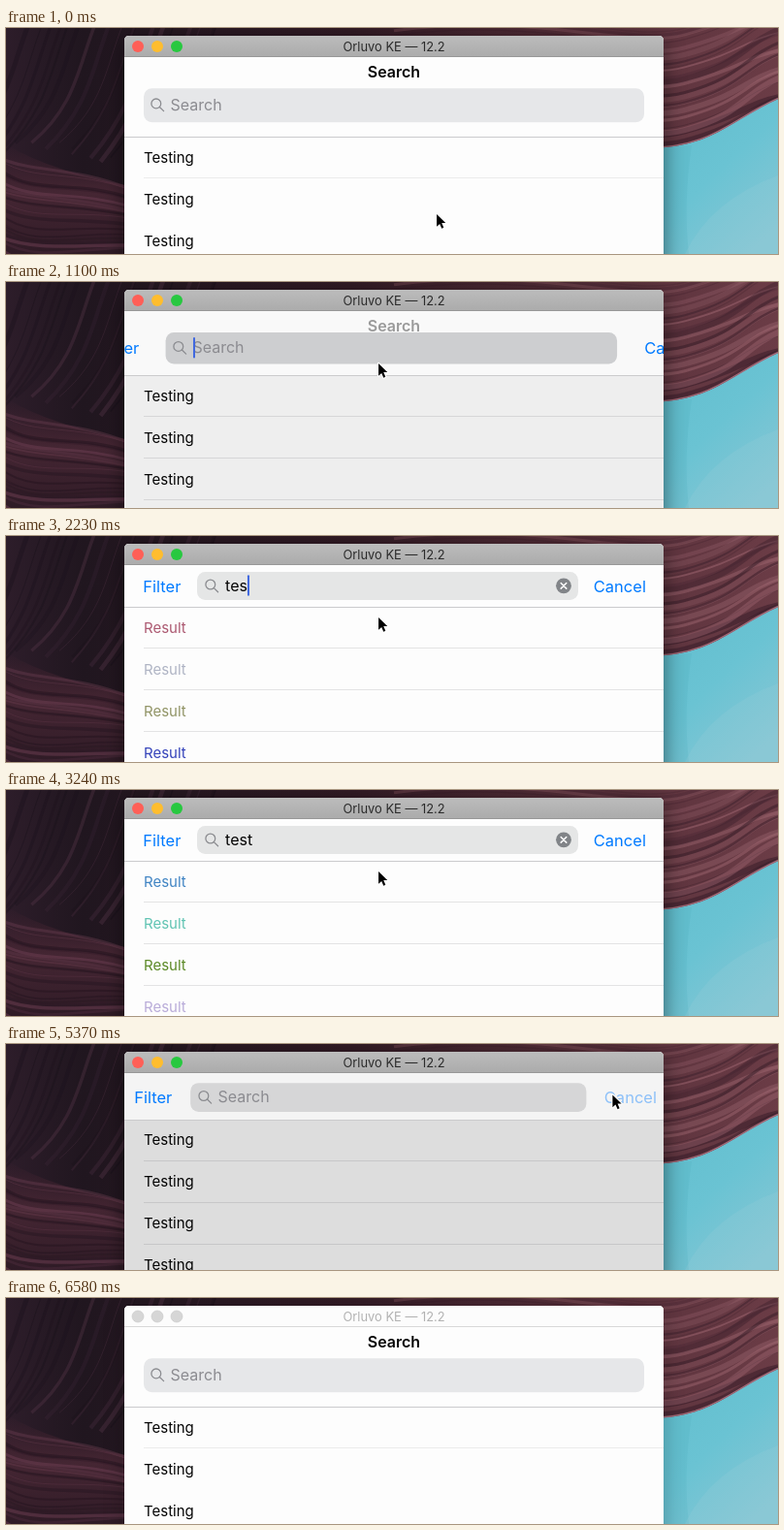
These frames come from a looping animation (796x233 px, 6680 ms). An HTML page:

```html
<!DOCTYPE html>
<html lang="en">
<head>
<meta charset="utf-8">
<title>Search bar</title>
<style>
  html, body { margin: 0; width: 100%; height: 100%; overflow: hidden; background: #211821; }
  svg { display: block; width: 100vw; height: 100vh; }
  text { font-family: Inter, Roboto, "Liberation Sans", sans-serif; font-size: 16px; white-space: pre; }
  .row { font-size: 15px; }
  .action { font-size: 16.5px; fill: #007aff; }
</style>
</head>
<body>
<svg id="stage" viewBox="0 0 796 233" preserveAspectRatio="none">
  <defs>
    <linearGradient id="rockBase">
      <stop offset="0" stop-color="#2d1d2a"/><stop offset=".1" stop-color="#20161f"/>
      <stop offset=".45" stop-color="#321b25"/><stop offset=".75" stop-color="#57303a"/>
      <stop offset="1" stop-color="#6b3c46"/>
    </linearGradient>
    <linearGradient id="lowerRock" x2="0" y2="1">
      <stop offset="0" stop-color="#472432" stop-opacity="0"/>
      <stop offset=".45" stop-color="#452633"/><stop offset="1" stop-color="#2f1b26"/>
    </linearGradient>
    <linearGradient id="water" x2=".8" y2="1">
      <stop offset="0" stop-color="#5fbdcd"/><stop offset=".55" stop-color="#6ac3d3"/>
      <stop offset="1" stop-color="#87c6d4"/>
    </linearGradient>
    <linearGradient id="barFill" x2="0" y2="1">
      <stop offset="0" stop-color="#bcbcbc"/><stop offset="1" stop-color="#ababab"/>
    </linearGradient>
    <filter id="blur" x="-20%" y="-20%" width="140%" height="140%"><feGaussianBlur stdDeviation="11"/></filter>
    <filter id="soften"><feGaussianBlur stdDeviation=".7"/></filter>
    <clipPath id="windowClip"><path d="M122 240V13q0-5 5-5h546q5 0 5 5v227z"/></clipPath>
  </defs>

  <rect width="796" height="233" fill="url(#rockBase)"/>
  <path d="M0 120Q50 150 140 165V233H0z" fill="url(#lowerRock)"/>
  <g id="strands" fill="none" filter="url(#soften)"/>
  <path d="M660 124C728 124 745 96 796 73V233H660z" fill="url(#water)"/>
  <path d="M704 233Q698 180 707 121L660 124V233z" fill="#4ba8ba" opacity=".2"/>
  <path d="M700 233Q726 178 796 152V233z" fill="#94cad8" opacity=".25"/>
  <path d="M660 123.5C728 123.5 745 95.5 796 72.5" fill="none" stroke="#a06a78" stroke-width="1.4"/>
  <rect id="shadow" x="122" y="14" width="556" height="260" rx="5" filter="url(#blur)"/>

  <g clip-path="url(#windowClip)">
    <rect x="122" y="8" width="556" height="225" fill="#fdfdfd"/>
    <g id="list"></g>
    <rect id="header" x="122" y="29" width="556"/>
    <rect id="headerLine" x="122" width="556" height="1" fill="#cbcbcd"/>
    <text id="heading" x="400" y="50.5" text-anchor="middle" font-weight="600" fill="#050505">Search</text>
    <rect id="field" rx="8.5"/>
    <g id="lens" fill="none" stroke="#8b8c90" stroke-width="1.3" stroke-linecap="round">
      <circle r="4.9"/><path d="M3.6 3.6L7.8 7.7"/>
    </g>
    <text id="fieldText"></text>
    <rect id="caret" width="2" height="21.5" rx="1" fill="#4068e0"/>
    <g id="clear" transform="translate(575 51.3)">
      <circle r="7.9" fill="#818488"/>
      <path d="M-2.8-2.8L2.8 2.8M2.8-2.8L-2.8 2.8" stroke="#fff" stroke-width="1.5" stroke-linecap="round"/>
    </g>
    <text id="filter" class="action">Filter</text>
    <text id="cancel" class="action">Cancel</text>
    <rect id="bar" x="122" y="8" width="556" height="21.5"/>
    <rect id="barLine" x="122" y="29" width="556" height="1"/>
    <circle class="light" cx="136" cy="19" r="6"/>
    <circle class="light" cx="156" cy="19" r="6"/>
    <circle class="light" cx="176" cy="19" r="6"/>
    <text id="windowTitle" x="400" y="24" text-anchor="middle" style="font-size:12.9px">Orluvo KE — 12.2</text>
  </g>

  <path id="pointer" d="M.6 1.4V14.2L3.7 11.4 5.8 16.2 7.8 15.3 5.8 10.6H9.8Z"
        fill="#000" stroke="#fff" stroke-width="2.2" stroke-linejoin="round" style="paint-order:stroke"/>
</svg>
<script>
const LOOP = 6680;
const SVG_NS = 'http://www.w3.org/2000/svg';
const $ = id => document.getElementById(id);

const KEYS = [[1880, 't'], [2060, 'te'], [2230, 'tes'], [2400, 'test'],
              [3600, 'tes'], [3840, 'te'], [4020, 't'], [4260, '']];
const TEST_COLORS = ['#4084c3', '#61c4b3', '#5c8a27', '#b9acd9'];
const LIGHTS = ['#ff5f57', '#ffbd2e', '#28c840'];
const MOVES = [
  { from: 240, to: 700, steps: 9, end: [383.5, 82.5] },
  { from: 4560, to: 5020, steps: 9, end: [624.8, 51] },
  { from: 5900, to: 6240, steps: 7, end: [786, 241] }
];

const set = (el, attrs) => { for (const name in attrs) el.setAttribute(name, attrs[name]); };
const add = (parent, tag, attrs) => {
  const el = document.createElementNS(SVG_NS, tag);
  set(el, attrs);
  return parent.appendChild(el);
};
const lerp = (a, b, p) => a + (b - a) * p;
const smooth = p => { p = Math.min(1, Math.max(0, p)); return p * p * (3 - 2 * p); };
const random = seed => { const v = Math.sin(seed * 127.1 + 3.7) * 43758.5453; return v - Math.floor(v); };
const mix = (a, b, p) => `rgb(${a.map((v, i) => Math.round(lerp(v, b[i], p)))})`;

// Number of steps taken: the first falls on `from`, the last on `to`.
function stepCount(t, from, to, steps) {
  if (t < from) return 0;
  return Math.min(steps, Math.floor((t - from) / (to - from) * (steps - 1) + 1e-6) + 1);
}

function drawStrands() {
  const strand = (d, color, width, opacity) =>
    add($('strands'), 'path', { d, stroke: color, 'stroke-width': width, opacity });
  for (let i = 0; i < 28; i++) {
    const y = 138 + i * 5 + random(i + 7) * 8, bend = 6 + random(i) * 18;
    strand(`M-5 ${y - 6}C30 ${y + bend} 70 ${y + 2} 130 ${y + 26 - i * 1.5}`,
      random(i + 50) < .5 ? '#734357' : '#22141e', .6 + random(i + 90) * 3, .2 + random(i + 30) * .3);
  }
  for (let i = 0; i < 18; i++) {
    const x = i * 12 - 20 + random(i + 11) * 12;
    strand(`M${x + 34} -5C${x + 16} 40 ${x + 14} 80 ${x - 32} ${118 + random(i) * 20}`,
      random(i + 60) < .5 ? '#59394d' : '#150f18', .8 + random(i + 20) * 4, .15 + random(i + 40) * .25);
  }
  for (let i = 0; i < 30; i++) {
    const y = i * 5.5 - 20 + random(i + 13) * 8, rise = 20 + random(i + 80) * 22;
    strand(`M400 ${y + 10}C550 ${y - 10} 640 ${y + 30} 700 ${y + 14}S760 ${y - rise * .6} 800 ${y - rise}`,
      random(i + 140) < .45 ? '#a9707a' : '#321a26', .8 + random(i + 170) * 6, .15 + random(i + 200) * .35);
  }
}

const rows = [];
function buildList() {
  for (let i = 0; i < 4; i++) {
    rows.push({
      label: add($('list'), 'text', { class: 'row', x: 142 }),
      line: add($('list'), 'rect', { x: 142, width: 536, height: 1 })
    });
  }
  rows.dim = add($('list'), 'rect', { x: 122, y: 30, width: 556, height: 203, fill: '#000' });
}

function openness(t) {
  const opening = smooth(stepCount(t, 988, 1220, 5) * .22);
  const closing = smooth(stepCount(t, 5370, 5600, 5) * .22);
  return opening - closing;
}

function caretOpacity(t) {
  if (t < 930 || t >= 5200) return 0;
  if (t >= 1760 && t < 1880) return t < 1820 ? .55 : .22;
  if (t >= 3060 && t < 3600) return 1 - stepCount(t, 3060, 3240, 4) / 4;
  if (t >= 4780) return 1 - stepCount(t, 4780, 4960, 4) / 4;
  return 1;
}

function pointerAt(t) {
  let pos = [443.5, 190.5];
  for (const { from, to, steps, end } of MOVES) {
    const p = smooth(stepCount(t, from, to, steps) / steps);
    pos = pos.map((v, i) => lerp(v, end[i], p));
  }
  return pos;
}

function resultColor(keyIndex, row) {
  if (KEYS[keyIndex][1] === 'test') return TEST_COLORS[row];
  const channel = c => Math.round(50 + 165 * random(keyIndex * 31 + row * 7 + c * 3 + 1));
  return `rgb(${[0, 1, 2].map(channel)})`;
}

function drawWindow(active) {
  set($('shadow'), { opacity: active ? .5 : .24 });
  set($('bar'), { fill: active ? 'url(#barFill)' : '#fcfcfc' });
  set($('barLine'), { fill: active ? '#989898' : '#d8d8d8' });
  set($('windowTitle'), { fill: active ? '#2b2b2b' : '#b2b2b2' });
  document.querySelectorAll('.light').forEach((el, i) => set(el, {
    fill: active ? LIGHTS[i] : '#d6d6d6', stroke: active ? 'none' : '#c6c6c6', 'stroke-width': .6
  }));
}

function drawList(top, open, keyIndex, query, resting) {
  rows.forEach(({ label, line }, i) => {
    label.textContent = query ? 'Result' : 'Testing';
    set(label, { y: top + 26.2 + 43 * i, fill: query ? resultColor(keyIndex, i) : '#050505' });
    set(line, {
      y: Math.floor(top + 42 + 43 * i),
      fill: resting ? '#ececec' : '#e3e3e4',
      opacity: resting && i === 1 ? 0 : 1
    });
  });
  set(rows.dim, { opacity: query ? 0 : .143 * open });
}

function drawField(t, open, query) {
  const x = lerp(142, 197, open), y = lerp(62.3, 37, open);
  const width = lerp(516, 393, open), height = lerp(35, 29, open);
  const middle = y + height / 2;
  const closed = t >= 930 && t < 1220 ? [200, 201, 205] : [230, 231, 233];
  set($('field'), { x, y, width, height, fill: query ? '#e5e6e6' : mix(closed, [212, 212, 212], open) });
  set($('lens'), { transform: `translate(${x + 12.8 + open} ${middle - 1.9 + open * .4})` });

  const textX = x + 27.5 + open + (query ? .6 : 0);
  const text = $('fieldText');
  text.textContent = query || 'Search';
  set(text, { x: textX, y: middle + 5.2, fill: query ? '#050505' : '#8b8b90' });
  const typedWidth = query ? text.getComputedTextLength() : .5;
  set($('caret'), { x: textX + typedWidth, y: middle - 11.2, opacity: caretOpacity(t) });
  set($('clear'), { opacity: query ? 1 : 0 });

  set($('filter'), { x: 141.3 - 73 * (1 - open), y: middle + 6.3 });
  set($('cancel'), { x: 605.8 + 89 * (1 - open), y: middle + 6.3, opacity: t >= 5200 ? .42 : 1 });
}

function draw(t) {
  const open = openness(t);
  const keyIndex = KEYS.filter(([time]) => time <= t).length - 1;
  const query = keyIndex < 0 ? '' : KEYS[keyIndex][1];
  const top = lerp(112.5, 73.3, open);

  drawWindow(t < 6580);
  drawList(top, open, keyIndex, query, t < 930 || t >= 5600);
  set($('header'), {
    height: top - 29,
    fill: query ? '#fdfdfd' : mix([253, 253, 253], [243, 243, 243], open)
  });
  set($('headerLine'), { y: Math.round(top - .5) });
  set($('heading'), { opacity: Math.max(0, 1 - open * 1.5) });
  drawField(t, open, query);
  set($('pointer'), { transform: `translate(${pointerAt(t)})` });
}

drawStrands();
buildList();
const start = performance.now();
function tick() {
  draw((performance.now() - start) % LOOP);
  requestAnimationFrame(tick);
}
tick();
</script>
</body>
</html>
```
